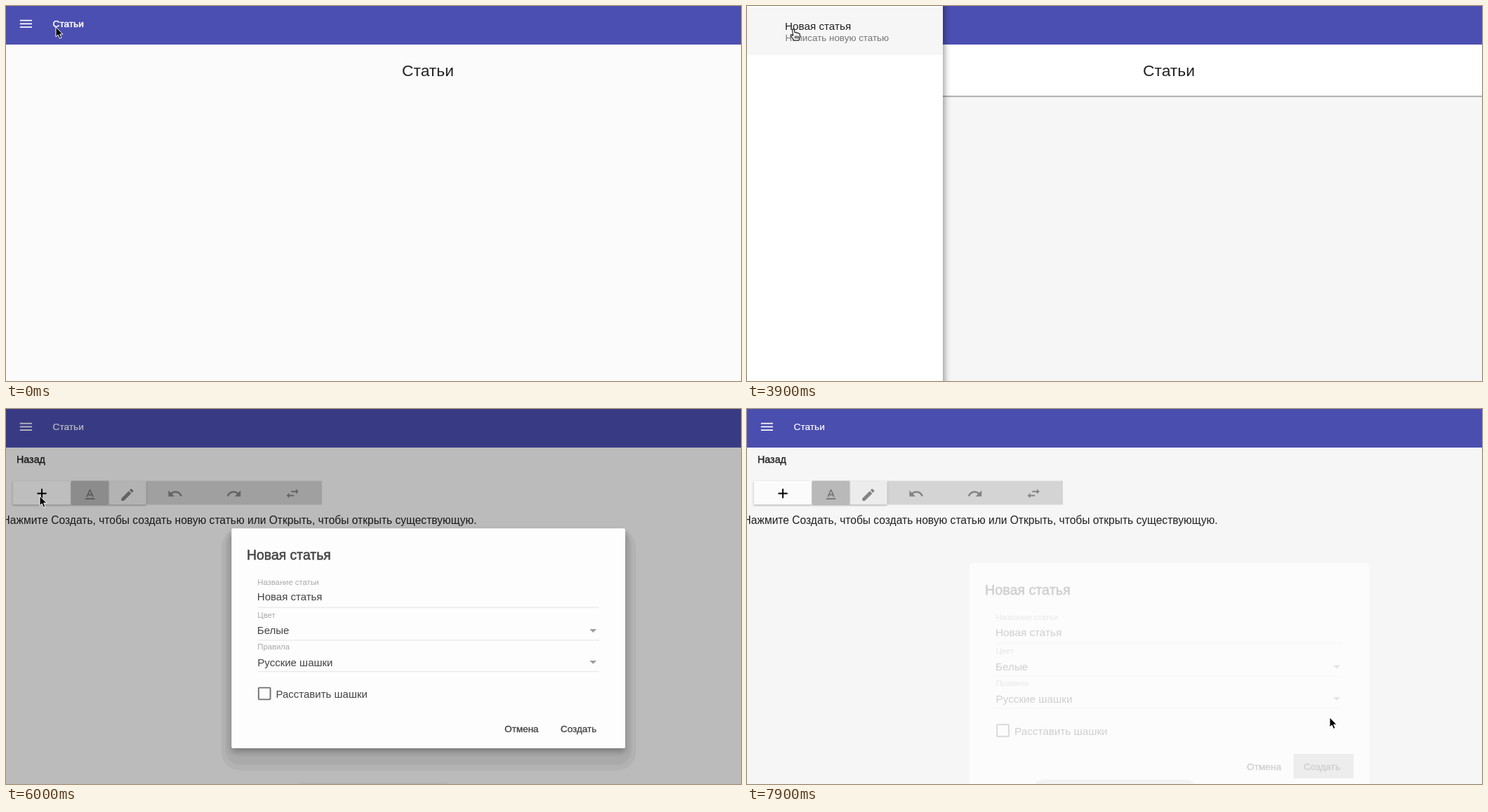
Animation of 1047 by 535 pixels, one loop 8 s. Source, as an HTML page:

```html
<!DOCTYPE html>
<html lang="ru">
<head>
<meta charset="utf-8">
<title>Статьи</title>
<style>
  html, body { margin: 0; width: 100%; height: 100%; overflow: hidden; background: #fafafa; }
  svg { display: block; }
  text { font: 15.25px "Liberation Sans", Arial, sans-serif; fill: #212121; white-space: pre; }
  .medium { font-size: 13.7px; stroke: #212121; stroke-width: .35px; }
  .back { font-size: 14.3px; }
  .heading { font-size: 22.8px; }
  .label { font-size: 11.45px; fill: #999; }
  .hint { font-size: 13.4px; fill: #757575; }
  .body { font-size: 15.58px; }
  .title { font-size: 19.7px; stroke: #212121; stroke-width: .5px; }
  #brand { fill: #fff; stroke: #fff; stroke-width: .5px; }
  .card { fill: #fff; filter: drop-shadow(0 1px 1.2px rgba(0,0,0,.55)); }
  .raised { filter: drop-shadow(0 1px 1px rgba(0,0,0,.35)); }
  #panel { fill: #fff; filter: drop-shadow(2px 0 5px rgba(0,0,0,.42)); }
  .rule { fill: #dedede; }
  .arrow { fill: #8c8c8c; }
  #dialog { transform-box: view-box; transform-origin: 601.75px 314.5px; }
  .glow { filter: drop-shadow(0 5px 5px rgba(0,0,0,.35)); }
</style>
</head>
<body>
<svg width="1047" height="535" viewBox="0 0 1047 535">
  <rect id="ground" width="1047" height="535"/>

  <g id="list">
    <rect id="listCard" class="card" x="-10" y="40" width="1067" height="88"/>
    <text class="heading" x="564" y="100">Статьи</text>
  </g>

  <g id="editor">
    <text class="medium back" x="15" y="77">Назад</text>
    <g id="buttons">
      <rect x="200" y="102.500" width="250" height="34" fill="#d7d7d7"/>
      <rect class="raised" x="9.500" y="102.500" width="83" height="34" rx="1" fill="#fff"/>
      <rect class="raised" x="146" y="102.500" width="53.500" height="34" rx="1" fill="#f0f0f0"/>
      <rect class="raised" x="93" y="102.500" width="53" height="34" fill="#bcbcbc"/>
      <g fill="#858585">
        <path transform="translate(161.500 111) scale(.95)" d="M3 17.25V21h3.75L17.81 9.94l-3.75-3.75L3 17.25zM20.71 7.04c.39-.39.39-1.02 0-1.41l-2.34-2.34c-.39-.39-1.02-.39-1.41 0l-1.83 1.83 3.75 3.75 1.83-1.83z"/>
        <path transform="translate(229.500 109.500) scale(.95)" d="M12.5 8c-2.65 0-5.05.99-6.9 2.6L2 7v9h9l-3.62-3.62c1.39-1.16 3.16-1.88 5.12-1.88 3.54 0 6.55 2.31 7.6 5.5l2.37-.78C21.08 11.03 17.15 8 12.5 8z"/>
        <path transform="translate(313.300 109.500) scale(.95)" d="M18.4 10.6C16.55 8.99 14.15 8 11.5 8c-4.65 0-8.58 3.03-9.96 7.22L3.9 16c1.05-3.19 4.05-5.5 7.6-5.5 1.95 0 3.73.72 5.12 1.88L13 16h9V7l-3.6 3.6z"/>
        <path transform="translate(396.800 109.200) scale(.95)" d="M6.99 11L3 15l3.99 4v-3H14v-2H6.99v-3zM21 9l-3.99-4v3H10v2h7.01v3L21 9z"/>
      </g>
    </g>
    <path transform="translate(39.700 109.100) scale(.95)" d="M19 13h-6v6h-2v-6H5v-2h6V5h2v6h6v2z"/>
    <path transform="translate(108.200 111) scale(.95)" fill="#747474" d="M5 17v2h14v-2H5zm4.500-4.200h5l.9 2.200h2.100L12.750 4h-1.500L6.500 15h2.100l.9-2.200zM12 5.980L13.870 11h-3.740L12 5.980z"/>
    <text class="body" x="-5.400" y="164">Нажмите Создать, чтобы создать новую статью или Открыть, чтобы открыть существующую.</text>
  </g>

  <rect width="1047" height="55" fill="#4b4fb1"/>
  <path transform="translate(17 14) scale(.95)" fill="#fff" d="M3 18h18v-2H3v2zm0-5h18v-2H3v2zm0-7v2h18V6H3z"/>
  <text id="brand" class="medium" x="66.500" y="29.500">Статьи</text>

  <g id="drawer">
    <rect id="panel" x="-20" y="-20" width="299" height="575"/>
    <rect y="2" width="279" height="68" fill="#f6f6f6"/>
    <text x="54" y="34">Новая статья</text>
    <text class="hint" x="54.500" y="49.500">Написать новую статью</text>
  </g>

  <rect id="backdrop" width="1047" height="535"/>

  <g id="dialog">
    <g id="shadow">
      <rect x="302" y="156" width="600" height="350" rx="27" opacity=".06"/>
      <rect x="308" y="160" width="588" height="338" rx="22" opacity=".05"/>
      <rect class="glow" x="317" y="155.500" width="569.500" height="318.500" rx="2" fill="#fff"/>
    </g>
    <rect id="surface" x="317" y="155.500" width="569.500" height="318.500" rx="2" fill="#fff"/>
    <g id="form">
      <text class="title" x="339" y="201">Новая статья</text>
      <text id="nameLabel" class="label" x="354.500" y="237">Название статьи</text>
      <text x="354" y="260">Новая статья</text>
      <rect id="nameRule" x="355" width="493.500"/>
      <text class="label" x="354.500" y="285">Цвет</text>
      <text x="354" y="309">Белые</text>
      <path class="arrow" d="M835 301.500h10l-5 5z"/>
      <rect class="rule" x="355" y="317" width="493.500" height="1"/>
      <text class="label" x="354.500" y="330.500">Правила</text>
      <text x="354.500" y="355">Русские шашки</text>
      <path class="arrow" d="M835 347h10l-5 5z"/>
      <rect class="rule" x="355" y="362.500" width="493.500" height="1"/>
      <rect x="356" y="386.300" width="17" height="17" rx="1" fill="none" stroke="#555" stroke-width="1.900"/>
      <text x="381" y="400.500">Расставить шашки</text>
      <rect id="pressed" x="778.500" y="428" width="85.500" height="35" opacity=".3"/>
      <text class="medium" x="712" y="451">Отмена</text>
      <text class="medium" x="793" y="451">Создать</text>
    </g>
  </g>

  <rect id="pill" x="407" width="233" height="40" rx="14" opacity=".035"/>

  <g id="pointer" stroke="#fff" stroke-linejoin="round">
    <path id="arrowCursor" d="M0 0v14l3.200-2.900 2.300 5.300 2.500-1.100-2.300-5.100h4.300z"/>
    <path id="handCursor" fill="#fff" stroke="#111" stroke-width="1.100" d="M-1.500 1.200C-1.500-.5 1-.5 1.300 1.200L2 5c.8-.8 2.200-.5 2.500.5.800-.7 2.200-.3 2.400.7 1-.5 2.400.1 2.400 1.500v3.300l-1.300 5H1L-3.400 9.800C-4.600 8.200-2.700 7.200-1.300 8.500L-.4 9.300zM2.600 9.500v4M4.800 9.500v4M6.900 9.500v4"/>
  </g>
</svg>
<script>
const LOOP = 8000, STEP = 100;
const el = id => document.getElementById(id);
const show = (id, on) => el(id).style.display = on ? '' : 'none';
const fade = (id, opacity) => el(id).style.opacity = opacity;
const clamp = v => Math.min(1, Math.max(0, v));

// cubic-bezier(.25, .8, .25, 1)
function swift(x) {
  if (x <= 0 || x >= 1) return clamp(x);
  const curve = (s, a, b) => 3 * a * s * (1 - s) ** 2 + 3 * b * s * s * (1 - s) + s ** 3;
  let lo = 0, hi = 1;
  for (let i = 0; i < 24; i++) {
    const mid = (lo + hi) / 2;
    if (curve(mid, .25, .25) < x) lo = mid; else hi = mid;
  }
  return curve(lo, .8, 1);
}
const slide = (t, start) => swift((t - start) / 400);

// time, x, y
const path = [
  [0, 71, 30], [900, 60, 27], [1100, 60, 27], [1700, 55, 16], [1900, 55, 16],
  [2500, 26, 23], [2900, 29, 25], [3000, 34, 29], [3500, 58, 33], [3800, 66, 33],
  [4600, 66, 33], [5400, 48, 124], [6300, 48, 124], [6900, 823, 424],
  [7300, 823, 424], [7600, 830, 440], [8000, 830, 440]
];

function pointerAt(t) {
  const i = Math.max(1, path.findIndex(p => p[0] > t));
  const [t0, x0, y0] = path[i - 1], [t1, x1, y1] = path[i];
  const k = clamp((t - t0) / (t1 - t0)), e = k * k * (3 - 2 * k);
  return [x0 + (x1 - x0) * e, y0 + (y1 - y0) * e];
}

function draw(t) {
  const editing = t >= 4200, detailed = t >= 5850;
  show('list', !editing);
  show('listCard', t >= 2850);
  show('editor', editing);
  show('buttons', detailed);
  el('ground').setAttribute('fill', editing ? '#fafafa' : t < 2850 ? '#fbfbfb' : '#f6f6f6');
  el('brand').style.strokeWidth = detailed ? '.2px' : '.5px';

  const open = slide(t, 2935) - slide(t, 4135);
  show('drawer', open > .001);
  el('drawer').setAttribute('transform', `translate(${279 * (open - 1)} 0)`);

  const enter = slide(t, 5858), leave = slide(t, 7775);
  fade('backdrop', .3 * enter * (1 - clamp((t - 7775) / 132)));
  show('dialog', enter > 0);
  fade('shadow', enter * clamp(1 - 1.25 * leave));
  fade('surface', enter * (1 - leave ** 5));
  fade('form', enter * (1 - leave));
  el('dialog').style.transform =
    `translateY(${80 * (1 - enter + leave)}px) scale(${.9 + .1 * enter})`;

  const focused = t >= 6250 && t < 7700;
  el('nameLabel').style.fill = focused ? '#4b4fb1' : '#999';
  const rule = el('nameRule');
  rule.setAttribute('fill', focused ? '#3d43a8' : '#dedede');
  rule.setAttribute('y', focused ? 269 : 269.5);
  rule.setAttribute('height', focused ? 2 : 1);
  show('pressed', t >= 7700);

  show('pill', t >= 7850 || (t >= 5950 && t < 6250));
  el('pill').setAttribute('y', t >= 7850 ? 529 : 533);

  const hand = t >= 2500 && t < 4700;
  show('handCursor', hand);
  show('arrowCursor', !hand);
  el('pointer').setAttribute('transform', `translate(${pointerAt(t)})`);
}

const start = performance.now();
function tick() {
  const t = (performance.now() - start) % LOOP;
  draw(Math.floor(t / STEP) * STEP);
  requestAnimationFrame(tick);
}
tick();
</script>
</body>
</html>
```
